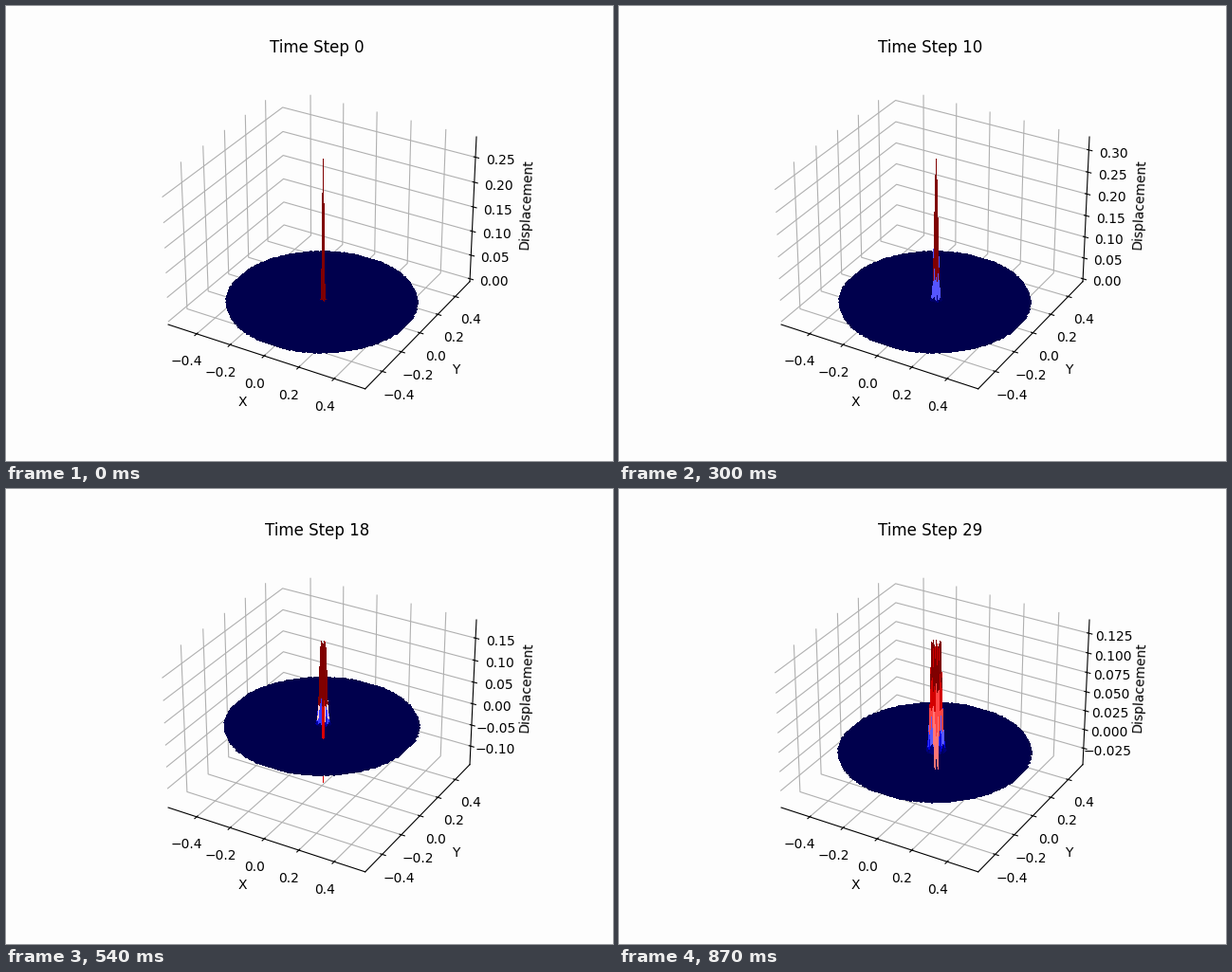
Animation of 640x480 px, one loop 0.9 s. Source, as a matplotlib script:

```python
import matplotlib.pyplot as plt
import numpy as np
from matplotlib.animation import FuncAnimation

N, STEPS = 100, 30
RATIO = 0.01        # squared Courant number
DIAGONAL = 0.075    # share of the diagonal neighbours
WARMUP = 2          # updates before the first picture
PAPER = "#fdfdfd"


def laplacian(u):
    rows = np.roll(u, 1, 0) + np.roll(u, -1, 0)
    near = rows + np.roll(u, 1, 1) + np.roll(u, -1, 1)
    far = np.roll(rows, 1, 1) + np.roll(rows, -1, 1)
    return (1 - DIAGONAL) * near + DIAGONAL * far - 4 * u


def simulate():
    """Heights of a membrane after a tap on its centre."""
    old, now = np.zeros((N, N)), np.zeros((N, N))
    now[N // 2, N // 2] = 0.1
    states = []
    for step in range(WARMUP + STEPS - 1):
        old, now = now, 2 * now - old + RATIO * laplacian(now)
        if step >= WARMUP - 1:
            states.append(now)
    return states


axis = np.linspace(-0.5, 0.5, N)
X, Y = np.meshgrid(axis, axis)
inside = X**2 + Y**2 <= 0.25
heights = [np.where(inside, u, np.nan) for u in simulate()]

fig = plt.figure(figsize=(6.4, 4.8), dpi=100, facecolor=PAPER)
ax = fig.add_subplot(projection="3d")


def draw(step):
    ax.clear()
    ax.set_facecolor(PAPER)
    for side in (ax.xaxis, ax.yaxis, ax.zaxis):
        side.set_pane_color(PAPER)
    ax.plot_surface(X, Y, heights[step], cmap="seismic", rstride=1, cstride=1,
                    linewidth=0, antialiased=False)
    ax.set_xlabel("X")
    ax.set_ylabel("Y")
    ax.set_zlabel("Displacement")
    ax.set_title(f"Time Step {step}")


anim = FuncAnimation(fig, draw, frames=STEPS, init_func=lambda: None,
                     interval=30, repeat=True, repeat_delay=0)
plt.show()
```
